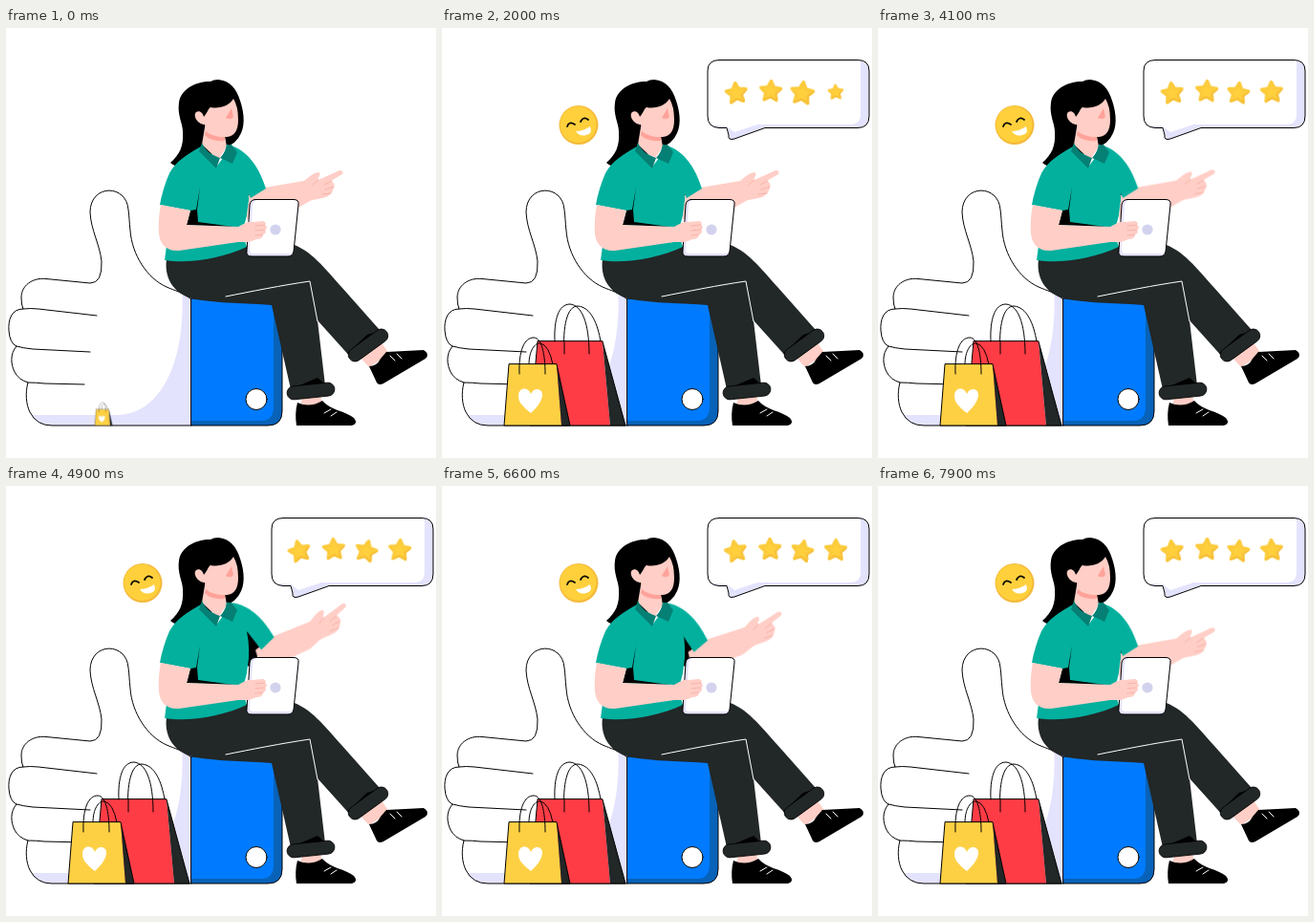
Animation of 450 by 450 pixels, one loop 8000 ms. Source, as an HTML page without scripts:

```html
<!DOCTYPE html>
<html lang="en">
<head>
<meta charset="utf-8">
<title>Customer review</title>
<style>
html, body { margin: 0; width: 100%; height: 100%; overflow: hidden; background: #fff; }
svg { display: block; width: 100%; height: 100%; }
.line { fill: none; stroke: #000; stroke-width: 1; stroke-linecap: round; stroke-linejoin: round; }
.white { fill: #fff; }
.pale { fill: #e4e3fd; }
.skin { fill: #ffcec6; }
.blush { fill: #ffa39a; }
.fold { fill: none; stroke: #f4aca2; stroke-width: .8; stroke-linecap: round; }
.teal { fill: #03b09e; }
.collar { fill: #067f74; }
.cloth { fill: #222727; }
.cuff { fill: #222727; stroke: #000; stroke-width: .8; }
.lace { fill: none; stroke: #fff; stroke-width: 1; stroke-linecap: round; }
.gold { fill: #ffd03c; }

.arm { transform-origin: 231px 123px; animation: point 1s cubic-bezier(.37,0,.63,1) infinite alternate; }
@keyframes point { to { transform: rotate(-12.6deg); } }

.pop { animation: 8s linear infinite; }
.small { transform-origin: 103px 416px; animation-name: small; }
.large { transform-origin: 146px 416px; animation-name: large; }
.smile { transform-origin: 143px 101px; animation-name: smile; }
.bubble { transform-origin: 300px 117px; animation-name: bubble; }
.s1 { animation-name: s1; }
.s2 { animation-name: s2; }
.s3 { animation-name: s3; }
.s4 { animation-name: s4; }
@keyframes small { 0% { transform: scale(.26); } 2.5% { transform: scale(1.1); } 4.5%, 100% { transform: none; } }
@keyframes large { 0%, 2.5% { transform: scale(0); } 5% { transform: scale(1.1); } 7%, 100% { transform: none; } }
@keyframes smile { 0%, 6.25% { transform: scale(0); } 8.75% { transform: scale(1.1); } 10.75%, 100% { transform: none; } }
@keyframes bubble { 0%, 11.75% { transform: scale(0); } 15% { transform: scale(1.1); } 17.5%, 100% { transform: none; } }
@keyframes s1 { 0%, 17.5% { transform: scale(0); } 20% { transform: scale(1.15); } 22%, 100% { transform: none; } }
@keyframes s2 { 0%, 19.5% { transform: scale(0); } 22% { transform: scale(1.15); } 24%, 100% { transform: none; } }
@keyframes s3 { 0%, 21.5% { transform: scale(0); } 24% { transform: scale(1.15); } 26%, 100% { transform: none; } }
@keyframes s4 { 0%, 23.5% { transform: scale(0); } 26% { transform: scale(1.15); } 28%, 100% { transform: none; } }

.tilt { animation: tilt 1s ease-in-out infinite alternate; }
.back { animation-name: back; }
@keyframes tilt { from { transform: rotate(3deg); } to { transform: translate(-1px, 0) rotate(-4deg); } }
@keyframes back { from { transform: rotate(-3deg); } to { transform: rotate(4deg); } }
</style>
</head>
<body>
<svg viewBox="0 0 450 450">
  <defs>
    <path id="hand" d="M194 284C184 276 177 275 168 271C148 262 132 238 130 212C129 203 129 197 128 190C126 163 88 163 88 193C89 212 98 226 100 244Q101 267 88 267L42 262.500C27 261 16 270 16 282Q16 290 18 294C6 294 2 305 3 317Q4 330 11 333C4 341 5 352 9 360Q13 368 23 371C20 382 21 394 25 402Q32 416 48 416H194Z"/>
    <path id="balloon" d="M290 33.500H435Q447 33.500 447 45V92Q447 104.500 435 104.500H338L306 116Q299 118 300 112L298 104.500H290Q278 104 278 92V45Q278 33.500 290 33.500Z"/>
    <g id="star" stroke-linejoin="round">
      <path d="M0-10.5L3.2-4L10.4-3L5.2 2L6.4 9.2L0 5.8L-6.4 9.2L-5.2 2L-10.4-3L-3.2-4Z" fill="#ffd03c" stroke="#fccb3c" stroke-width="3.4"/>
      <path d="M10.8-2L5.8 2.6L7 9.6L0 6.3L-6.6 9.6" fill="none" stroke="#f6bd38" stroke-width="1.600" stroke-linecap="round"/>
    </g>
    <clipPath id="palm"><use href="#hand"/></clipPath>
    <clipPath id="talk"><use href="#balloon"/></clipPath>
  </defs>

  <!-- thumbs up -->
  <use href="#hand" class="white"/>
  <path class="pale" clip-path="url(#palm)" d="M20 405H118C162 403 189 350 184 270H195V418H20Z"/>
  <use href="#hand" class="line"/>
  <path class="line" d="M18 294Q25 293 34 294L95 301M11 333Q18 335 28 336L88 339M23 371Q32 371 40 372L82 373"/>
  <path d="M194 283H289V401Q289 416 274 416H194Z" fill="#0862b8"/>
  <path class="blue" d="M194 283H280V396Q280 411 267 411H194Z" fill="#007bff"/>
  <path class="line" d="M194 283H289V401Q289 416 274 416H194Z"/>
  <circle class="white" cx="262" cy="388.500" r="11"/>
  <circle class="line" cx="262" cy="388.500" r="11"/>

  <!-- legs and shoes -->
  <path class="skin" d="M370 344L392 328L401 341L380 355ZM311 383H329L331 396H308Z"/>
  <path d="M380 354Q388 354 392 346L398 339Q418 338 437 337Q444 341 439 346L395 372Q389 375 387 369Z"/>
  <path d="M305 392Q318 398 331 390C339 400 356 401 364 408Q369 414 362 416H304Q302 403 305 392Z"/>
  <path class="lace" d="M402 343L407 348M409 341L414 346M333 403L340 399M340 406L346 402"/>
  <path class="cloth" d="M240 229L298 226C318 231 334 252 352 272L391 316L362 346L326 306L280 262Z"/>
  <path d="M357 341L378 321L388 318L368 342Z"/>
  <path class="cloth" d="M168 242C165 264 178 280 198 284C222 288 252 288 278 290L298 378L334 374L326 306L322 268C310 240 280 229 250 228Z"/>
  <path d="M298 378L326 366L334 373Z"/>
  <path class="lace" d="M230 281C255 276 290 269 318 265L326 307"/>
  <rect class="cuff" x="-25" y="-7" width="50" height="14" rx="7" transform="translate(319 380) rotate(-6)"/>
  <rect class="cuff" x="-24" y="-7" width="48" height="14" rx="7" transform="translate(379 332) rotate(-36)"/>

  <!-- hair and head -->
  <path d="M214 56C198 56 183 64 181 78C179 91 185 100 185 108C186 124 182 132 172 141C179 148 195 147 203 139L228 125Q241 122 246 110C251 99 248 85 245 76C241 63 234 55 222 54Q217 54 214 56Z"/>
  <path class="skin" d="M209 98L205 122L222 138L231 124L229 113Z"/>
  <path class="blush" d="M209 108Q216 114 229 114V118Q214 119 208 112Z"/>
  <path class="skin" d="M199 88C203 86 206 89 207 93C211 88 212 84 214 83C224 85 234 81 238 74Q243 82 243 96Q243 113 231 114C219 115 211 108 208 101C201 101 195 92 199 88Z"/>
  <path class="blush" d="M236 84L238 93Q235 97 230 94Z"/>

  <!-- pointing arm -->
  <path d="M250 148L262 160L267 171L257 190L248 186Z"/>
  <g class="arm">
    <path class="skin" d="M250 177L271 167L312 160C317 156 322 151 328 151C330 155 325 157 327 159L349 149Q354 149 352 153L340 160C345 162 344 167 341 172C337 179 326 178 318 181L306 188L252 200Z"/>
    <path class="fold" d="M327 159L321 164M341 160L333 164M343 166L334 169M340 173L331 174"/>
    <path class="teal" d="M231 122C251 126 264 143 272 168L256 178L246 157L226 142Z"/>
  </g>

  <!-- shirt -->
  <path class="teal" d="M204 124C190 132 178 139 171 152Q164 168 161 185L193 191L190 205L168 228L166 243C192 247 226 241 252 229Q246 214 252 196L254 180Q256 142 236 124L221 144Z"/>
  <path d="M203 167L200 190L201 203L238 208L189 206L193 191L199 190Z"/>
  <path class="collar" d="M205 120C208 128 215 133 224 136L220 147L202 129ZM231 123Q229 131 224 136L237 142L242 130L236 122Z"/>

  <!-- tablet and holding arm -->
  <path class="pale" d="M261 179.500H301Q307 179.500 306 185L301 234Q300 239 295 239H257Q251 239 252 233L255 185Q256 179.500 261 179.500Z"/>
  <path class="white" d="M264 180H301Q306 180 305 185L301 232Q300 236 296 236H259Q254 236 255 231L258 185Q259 180 264 180Z"/>
  <path class="line" d="M261 179.500H301Q307 179.500 306 185L301 234Q300 239 295 239H257Q251 239 252 233L255 185Q256 179.500 261 179.500Z"/>
  <circle cx="282" cy="211" r="5.6" fill="#d3d2ee"/>
  <path class="skin" d="M162 185L193 191L189 206L243 208C249 205 253 202 258 203L269 202Q273 203 271 206Q275 209 271 211Q274 214 269 216Q269 221 262 221C255 225 249 224 243 224L181 233C168 234 161 226 160 215Q159 200 162 185Z"/>
  <path class="fold" d="M271 206L261 207M271 211L261 212M269 216L261 217"/>

  <!-- shopping bags -->
  <g class="pop large">
    <path class="line" d="M128 341C126 312 131 291 142 291C156 292 163 310 166 328"/>
    <path d="M100 328H168L176 416H92Z" fill="#fe3c45"/>
    <path class="cloth" d="M168 328L192 416H176Z"/>
    <path class="line" d="M168 328L192 416H92L100 328ZM118 328C117 305 122 289 134 289C146 290 154 308 154 341M128 328V341"/>
  </g>
  <g class="pop small">
    <path class="line" d="M91 352C91 338 97 329 103 330Q112 332 116 352"/>
    <path d="M70 352H120L125 416H65Z" fill="#fdd044"/>
    <path class="cloth" d="M120 352L134 416H125Z"/>
    <path class="line" d="M120 352L134 416H65L70 352ZM81 362C80 338 86 324 96 324C104 324 108 340 108 362"/>
    <path class="white" d="M93 403C83 395 80 391 80 385C80 376 90 375 93 383C96 375 106 377 105 385Q104 393 93 403Z"/>
  </g>

  <!-- smiley -->
  <g class="pop smile">
    <circle cx="143" cy="101.500" r="20.500" fill="#f4b93a"/>
    <circle class="gold" cx="142.500" cy="101" r="19"/>
    <path class="line" style="stroke-width:1.8" d="M131 103Q133 97 139 101M145 98Q148 92 153 96"/>
    <path class="white" d="M140 108Q148 108 155 103Q158 111 151 112Q144 114 140 108Z"/>
  </g>

  <!-- review bubble -->
  <g class="pop bubble">
    <use href="#balloon" class="pale"/>
    <path class="white" clip-path="url(#talk)" d="M276 32H438V90Q438 101 427 101H330L306 109L298 103L276 101Z"/>
    <use href="#balloon" class="line"/>
  </g>
  <g transform="translate(308 68) rotate(-10)"><g class="pop s1"><use href="#star" class="tilt"/></g></g>
  <g transform="translate(344 66)"><g class="pop s2"><use href="#star" class="tilt"/></g></g>
  <g transform="translate(377 68) rotate(10)"><g class="pop s3"><use href="#star" class="tilt back"/></g></g>
  <g transform="translate(412 67)"><g class="pop s4"><use href="#star" class="tilt back"/></g></g>
</svg>
</body>
</html>
```
